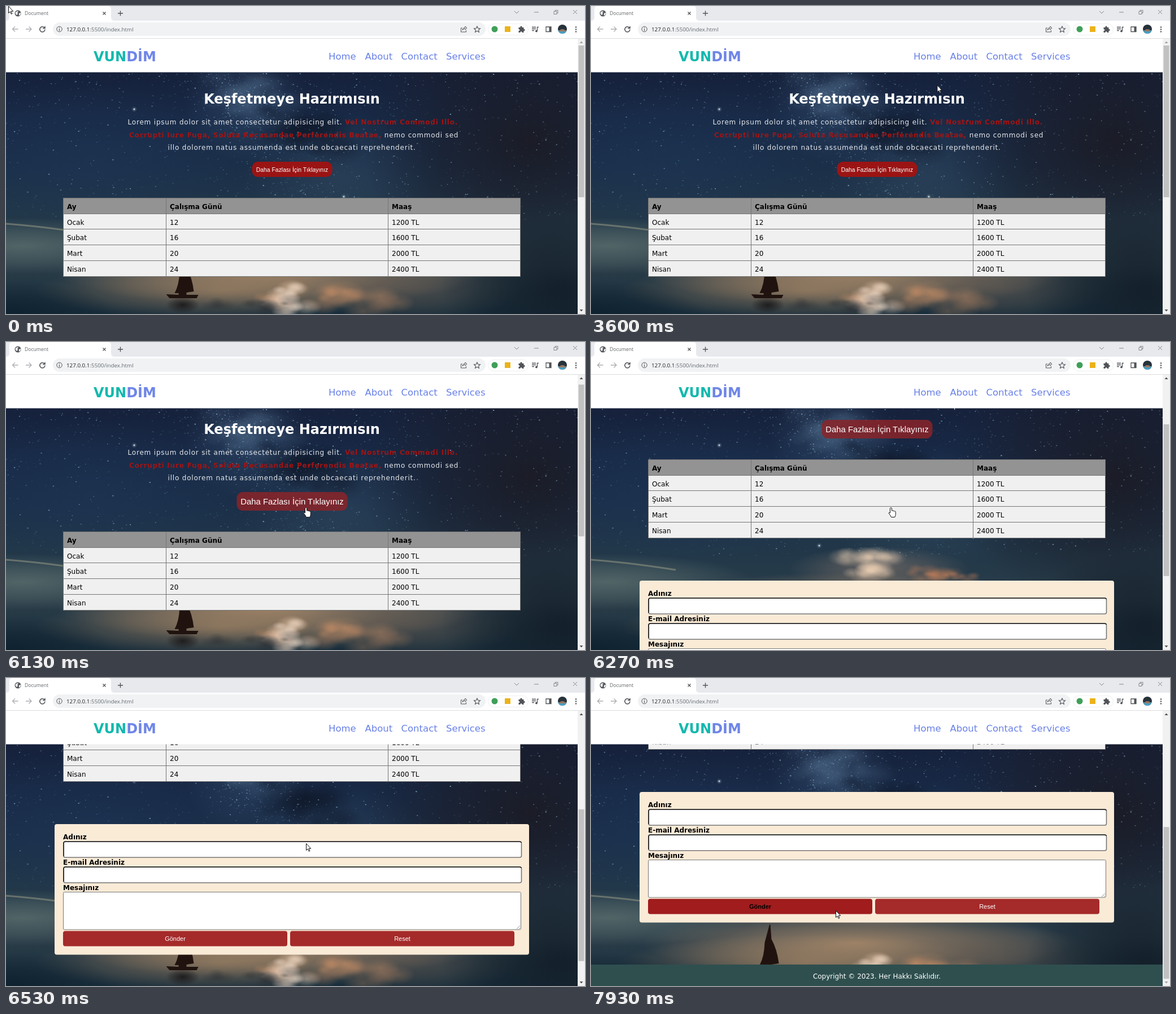
Animation, 1025 px wide and 546 px high, one loop 8 s. Source, as an HTML page with a canvas:

```html
<!DOCTYPE html>
<html lang="tr">
<head>
<meta charset="utf-8">
<title>Document</title>
<style>
  html, body { margin: 0; width: 100%; height: 100%; overflow: hidden; background: #fff; }
  canvas, svg { position: absolute; left: 0; top: 0; }
  text { font: 12px "DejaVu Sans", sans-serif; white-space: pre; }
  .b, .b text { font-weight: bold; }
  .mid { text-anchor: middle; }
  .ui { font-family: "Open Sans", "Noto Sans", sans-serif; }
  .btn { font: 11px "Liberation Sans", Arial, sans-serif; fill: #fff; text-anchor: middle; }
  .para { fill: #e6e8ec; letter-spacing: .81px; }
  .para .b { fill: #a01414; }
  .nav text { font-size: 16.5px; fill: #6880e8; }
  .nav .on { fill: #a01818; }
  .icon { fill: none; stroke: #505357; stroke-width: 1.3; }
  .cell { fill: none; stroke: #757575; }
  #more rect { fill: #9b1414; }
  #more text { font-size: 10.4px; }
  #more.on rect { fill: #8a2429; fill-opacity: .85; }
  #more.on text { font-size: 14.9px; }
  #send rect, #reset rect { fill: #a52a2a; }
  #send.on rect { fill: #a01c1d; }
  #send.on text { fill: #000; font-weight: bold; }
</style>
</head>
<body>
<canvas id="sky" width="1025" height="546"></canvas>
<svg width="1025" height="546">
  <clipPath id="view"><rect y="117" width="1012" height="429"/></clipPath>
  <g clip-path="url(#view)">
    <g id="page">
      <text class="b mid" x="506" y="173" style="font-size:24px" fill="#fff">Keşfetmeye Hazırmısın</text>
      <text class="para" x="215.5" y="210">Lorem ipsum dolor sit amet consectetur adipisicing elit. <tspan class="b">Vel Nostrum Commodi Illo.</tspan></text>
      <text class="para" x="218" y="232.5"><tspan class="b">Corrupti Iure Fuga, Soluta Recusandae Perferendis Beatae,</tspan> nemo commodi sed</text>
      <text class="para" x="286.5" y="255">illo dolorem natus assumenda est unde obcaecati reprehenderit.</text>
      <g id="more">
        <rect y="276" rx="11"/>
        <text class="btn" x="506.5">Daha Fazlası İçin Tıklayınız</text>
      </g>
      <g id="lower">
        <g id="table"></g>
        <rect x="86" y="555" width="840" height="231.5" rx="4" fill="#faebd7"/>
        <g class="b">
          <text x="101" y="582">Adınız</text>
          <text x="101" y="627">E-mail Adresiniz</text>
          <text x="101" y="672">Mesajınız</text>
        </g>
        <g fill="#fff" stroke="#767676" stroke-width="1.6">
          <rect x="102" y="586" width="810.5" height="28" rx="3"/>
          <rect x="102" y="631" width="810.5" height="28" rx="3"/>
          <rect x="101.5" y="675.5" width="810" height="66.5" rx="2" stroke-width="1"/>
        </g>
        <path d="M102 612v-23q0-3 3-3h804q3 0 3 2M102 657v-23q0-3 3-3h804q3 0 3 2" fill="none" stroke="#1c1c1c" stroke-width="1.6"/>
        <path d="M904 741l6-6M908 741l2-2" stroke="#777" stroke-width=".8"/>
        <g id="send">
          <rect x="101" y="744.5" width="397" height="27" rx="4"/>
          <text class="btn" x="299.5" y="762">Gönder</text>
        </g>
        <g id="reset">
          <rect x="503" y="744.5" width="397" height="27" rx="4"/>
          <text class="btn" x="701.5" y="762">Reset</text>
        </g>
        <rect y="861" width="1012" height="40" fill="#2f4f4f"/>
        <text class="mid" x="506" y="885.5" fill="#fff">Copyright © 2023. Her Hakkı Saklıdır.</text>
      </g>
    </g>
  </g>

  <rect width="1025" height="117.5" fill="#fff"/>
  <text class="b" x="155" y="98" style="font-size:24px" fill="#12b9ae">VUN<tspan fill="#6f86e8">DİM</tspan></text>
  <g class="nav" id="nav">
    <text x="571" y="94.5">Home</text>
    <text x="635.5" y="94.5">About</text>
    <text x="699.5" y="94.5">Contact</text>
    <text x="779" y="94.5">Services</text>
  </g>

  <!-- browser frame -->
  <rect width="1025" height="26" fill="#e7e9ed"/>
  <path d="M0 26q6 0 6-6V5q0-5 6-5h168q6 0 6 5v15q0 6 6 6z" fill="#fff"/>
  <circle cx="21" cy="13" r="5.5" fill="#55585c"/>
  <path d="M17 11q3-3 5-1l-2 2 1 2-2 2q-3-2-2-5M23 13l3-1q0 4-3 5z" fill="#fff"/>
  <text class="ui" x="33" y="16" style="font-size:8.6px" fill="#606468">Document</text>
  <g class="icon">
    <path d="M171.5 10.5l5 5m0-5l-5 5M198 13h9m-4.5-4.5v9"/>
    <path d="M900 9l4 4 4-4M935 11h8M970 9.5h5v5h-5zM972 9.5v-2h5v5h-2M1004 7l7 7m0-7l-7 7" stroke="#85888d" stroke-width="1"/>
    <path d="M21.5 41h-10m4.5-4.5l-4.5 4.5 4.5 4.5M35 41h10m-4.5-4.5l4.5 4.5-4.5 4.5" style="stroke:#adafb3"/>
    <path d="M68 38.5a4.6 4.6 0 1 0 1 3M69 36v3.5h-4" stroke-width="1.5"/>
  </g>
  <rect x="83" y="29" width="766" height="24" rx="12" fill="#f0f2f4"/>
  <circle class="icon" cx="94.5" cy="41" r="4.7" style="stroke-width:1"/>
  <path d="M94.5 40.5v3.5m0-6v1.2" stroke="#505357" stroke-width="1.2"/>
  <text class="ui" x="107" y="45" style="font-size:9.8px" fill="#222">127.0.0.1<tspan fill="#666a6e">:5500/index.html</tspan></text>
  <rect x="853.5" y="31.5" width="71" height="20" rx="10" fill="#fff" stroke="#eceef0"/>
  <g class="icon">
    <path d="M808 39h-2.5v7h9v-3M808 43q1-5 5-5v-2l3 3-3 3v-2q-3 0-5 3" style="stroke-width:1"/>
    <path d="M834 36l1.6 3.5 3.9.4-2.9 2.6.8 3.8-3.4-2-3.4 2 .8-3.8-2.9-2.6 3.9-.4z" style="stroke-width:1.1"/>
    <path d="M931 37.5h7m-7 3h7m-7 3h4M940.5 44v-6.5h2.5"/>
    <circle cx="939" cy="44.5" r="1.3" fill="#505357"/>
    <path d="M956 37h9v8.5h-9z"/>
  </g>
  <path d="M961.5 37h3.5v8.5h-3.5zM907.500 38h3q-.5-2.500 1.500-2.500t1.500 2.500h3v3q2.300-.3 2.300 1.500t-2.300 1.500v3h-3q0-2-1.500-2t-1.500 2h-3v-3q2 0 2-1.500t-2-1.500z" fill="#505357"/>
  <circle cx="865" cy="41" r="5.5" fill="#3f9f57"/>
  <rect x="883" y="36" width="10" height="10" fill="#eab31c"/>
  <circle cx="985" cy="41" r="8" fill="#27323b"/>
  <path d="M977.5 43h15q-2 6-7.5 6t-7.5-6z" fill="#4a9fc6"/>
  <path d="M980 45q0-4 5-4t5 4z" fill="#98765f"/>
  <g fill="#505357"><circle cx="1009" cy="37.5" r="1.2"/><circle cx="1009" cy="41.5" r="1.2"/><circle cx="1009" cy="45.5" r="1.2"/></g>
  <path d="M0 57.5h1025" stroke="#dcdee1"/>

  <rect x="1012" y="58" width="13" height="488" fill="#f1f1f1"/>
  <rect id="thumb" x="1013.5" width="10" height="269" fill="#c1c1c1"/>
  <path id="up" d="M1015.5 66l3-3.5 3 3.5z"/>
  <path id="down" d="M1015.5 538l3 3.5 3-3.5z"/>

  <g id="tip">
    <rect x="4" y="27" width="195" height="46" rx="7" fill="#000" opacity=".12"/>
    <rect x="5" y="26" width="192.5" height="45" rx="6" fill="#fff" stroke="#d0d2d5" stroke-width=".7"/>
    <text class="ui" x="18.5" y="44.5" style="font-size:9.6px" fill="#222">Document</text>
    <text class="ui" x="18.5" y="59" style="font-size:8.9px" fill="#222">127.0.0.1:5500</text>
  </g>
  <g id="cursor" fill="#fff" stroke="#111" stroke-linejoin="round">
    <path d="M.5.5v12l2.7-2.5 2 4.3 1.800-.8-2-4.2h3.7z"/>
    <path d="M-1.5 10V1.5q1.5-2 3 0V6q1.5-1 2.5.5 1.5-.8 2.300.6 2-.6 2 1.400v4q0 2-1.5 5H.5q-1-3-4.5-7 0-2 2.500-.5z"/>
    <path d="M-3-8h2q1 0 1 1V7q0 1-1 1h-2M3-8H1q-1 0-1 1V7q0 1 1 1h2" fill="none"/>
  </g>
</svg>
<script>
const $ = id => document.getElementById(id);

function drawSky() {
  const c = $('sky').getContext('2d');
  const base = c.createLinearGradient(0, 118, 0, 546);
  ['#16213b', '#182a47', '#1b2f49', '#223849', '#2a3d49', '#182d3b']
    .forEach((col, i) => base.addColorStop(i / 5, col));
  c.fillStyle = base;
  c.fillRect(0, 117, 1012, 429);

  let seed = 7;
  const rnd = () => (seed = seed * 16807 % 2147483647) / 2147483647;
  const spread = () => rnd() + rnd() - 1;
  const blob = (x, y, rx, ry, rgb, a) => {
    c.save();
    c.translate(x, y);
    c.scale(rx, ry);
    const g = c.createRadialGradient(0, 0, 0, 0, 0, 1);
    g.addColorStop(0, `rgba(${rgb},${a})`);
    g.addColorStop(.5, `rgba(${rgb},${a * .55})`);
    g.addColorStop(1, `rgba(${rgb},0)`);
    c.fillStyle = g;
    c.fillRect(-1, -1, 2, 2);
    c.restore();
  };
  // Loose heap of small soft puffs around a centre.
  const puffs = (n, x, y, w, h, size, rgb, a) => {
    for (let i = 0; i < n; i++) {
      const r = size * (.5 + rnd());
      blob(x + spread() * w, y + spread() * h, r * 1.8, r, rgb, a);
    }
  };

  // night sky and galaxy band
  blob(150, 270, 260, 130, '30,56,90', .4);
  blob(425, 170, 110, 110, '62,90,122', .4);
  blob(590, 300, 170, 110, '65,92,115', .3);
  puffs(30, 430, 160, 80, 50, 16, '85,115,145', .16);
  puffs(24, 520, 225, 80, 50, 22, '14,22,38', .25);
  blob(930, 240, 300, 240, '27,26,35', .9);

  // left shore light
  blob(30, 425, 260, 50, '110,128,122', .6);
  c.strokeStyle = 'rgba(170,168,140,.45)';
  c.lineWidth = 3;
  c.stroke(new Path2D('M0 386q60 4 150 18'));

  // clouds, horizon glow and reflection
  blob(510, 402, 160, 40, '170,140,120', .45);
  puffs(26, 490, 395, 50, 24, 11, '255,222,190', .32);
  puffs(20, 610, 412, 90, 12, 9, '215,135,90', .3);
  blob(470, 470, 380, 62, '190,150,112', .75);
  blob(380, 505, 330, 50, '185,145,105', .55);
  blob(720, 500, 190, 60, '115,98,84', .5);
  puffs(26, 570, 520, 150, 26, 14, '215,150,105', .26);
  puffs(16, 505, 520, 50, 26, 12, '255,232,212', .38);
  puffs(14, 440, 528, 110, 14, 9, '40,44,50', .3);
  blob(0, 546, 200, 60, '10,28,42', .7);
  blob(980, 500, 210, 130, '16,26,36', .8);

  for (let i = 0; i < 1700; i++) {
    const y = 119 + 260 * Math.pow(rnd(), 1.3);
    const x = i % 3 ? rnd() * 1012 : 370 + (y - 118) * .8 + spread() * 110;
    const s = .6 + rnd() * 1.1;
    c.fillStyle = `rgba(140,185,215,${.15 + .7 * rnd() ** 3})`;
    c.fillRect(x, y, s * 1.4, s);
  }
  for (const [x, y] of [[598, 338], [404, 361], [227, 183]]) {
    blob(x, y, 5, 5, '170,205,225', .4);
    blob(x, y, 2, 2, '255,255,240', 1);
  }

  blob(313, 530, 30, 15, '20,18,20', .8);
  c.fillStyle = '#20130f';
  c.fill(new Path2D('M316 437h1.5l2 26q10 18 13 43l-13 2v4h21l-3 6h-48l-6-7 22 1v-3h-7q8-14 9-40z'));
}

function drawTable() {
  const rows = [['Ay', 'Çalışma Günü', 'Maaş'], ['Ocak', 12, '1200 TL'], ['Şubat', 16, '1600 TL'],
    ['Mart', 20, '2000 TL'], ['Nisan', 24, '2400 TL']];
  const cols = [101.5, 283.5, 676.5, 910.5];
  const top = r => Math.round(341 + r * 27.7) - .5;
  $('table').innerHTML = rows.map((row, r) => row.map((s, i) => {
    const y = top(r);
    const box = `x="${cols[i]}" y="${y}" width="${cols[i + 1] - cols[i]}" height="${top(r + 1) - y}"`;
    return `<rect ${box} fill="${r ? '#f0f0f0' : '#939393'}"/><rect class="cell" ${box}/>` +
      `<text class="${r ? '' : 'b'}" x="${cols[i] + 6.5}" y="${y + 19.5}">${s}</text>`;
  }).join('')).join('');
}

// Keys are [step, value, ...]; values between keys are linear.
function along(keys, k) {
  let i = 0;
  while (i < keys.length - 2 && k >= keys[i + 1][0]) i++;
  const [a, b] = [keys[i], keys[i + 1]];
  const p = Math.min(1, Math.max(0, (k - a[0]) / (b[0] - a[0])));
  return a.slice(1).map((v, j) => v + (b[j + 1] - v) * p);
}

const pointer = [[12, 4, 0], [13, -4, -2], [32, -4, -2], [33, 26, 0], [35, 110, 18], [39, 400, 85], [42, 487, 104],
  [44, 487, 104], [46, 486, 118], [50, 545, 197], [53, 610, 165], [55, 615, 115], [57, 592, 96],
  [58, 592, 96], [65, 665, 96], [71, 745, 96], [75, 782, 97], [76, 782, 97], [78, 800, 105], [84, 615, 245],
  [87, 545, 290], [89, 531, 293], [101, 531, 293], [110, 427, 316], [116, 430, 385], [119, 433, 412]];
const wheel = [[91, 0], [92, 10], [94, 138], [98, 296], [101, 353]];
const tipFade = [[6, 0], [10, 1], [33, 1], [36, 0]];
const links = [...$('nav').children].map((el, i) => ({ el, from: [571, 635, 699, 779][i], to: [620, 685, 763, 847][i] }));

function render(t) {
  const k = Math.floor((t + 4) * 15 / 1000);
  const [x, y] = along(pointer, k), [scroll] = along(wheel, k);

  let hand = false;
  for (const { el, from, to } of links) {
    const on = y > 78 && y < 101 && x >= from && x <= to;
    el.classList.toggle('on', on);
    hand ||= on;
  }

  const more = k >= 87 && k <= 96, w = more ? 196 : 142, h = more ? 33 : 27;
  const [box, label] = $('more').children;
  $('more').classList.toggle('on', more);
  box.setAttribute('x', 506.5 - w / 2);
  box.setAttribute('width', w);
  box.setAttribute('height', h);
  label.setAttribute('y', more ? 298 : 293.5);
  $('lower').setAttribute('transform', `translate(0 ${h - 27})`);
  $('page').setAttribute('transform', `translate(0 ${-Math.round(scroll)})`);
  $('send').classList.toggle('on', k > 110 && y > 391);

  $('thumb').setAttribute('y', 70 + scroll * .55);
  $('up').setAttribute('fill', scroll > 0 ? '#505050' : '#a3a3a3');
  $('down').setAttribute('fill', scroll < 353 ? '#505050' : '#a3a3a3');

  $('tip').setAttribute('opacity', along(tipFade, k)[0]);
  const beam = k > 101 && (y < 306 || y > 322 && y < 389);
  const shape = beam ? 2 : hand || more ? 1 : 0;
  [...$('cursor').children].forEach((p, i) => p.setAttribute('visibility', i === shape ? 'visible' : 'hidden'));
  $('cursor').setAttribute('transform', `translate(${x} ${y})`);
}

drawSky();
drawTable();
(function tick() {
  render(performance.now() % 8000);
  requestAnimationFrame(tick);
})();
</script>
</body>
</html>
```
